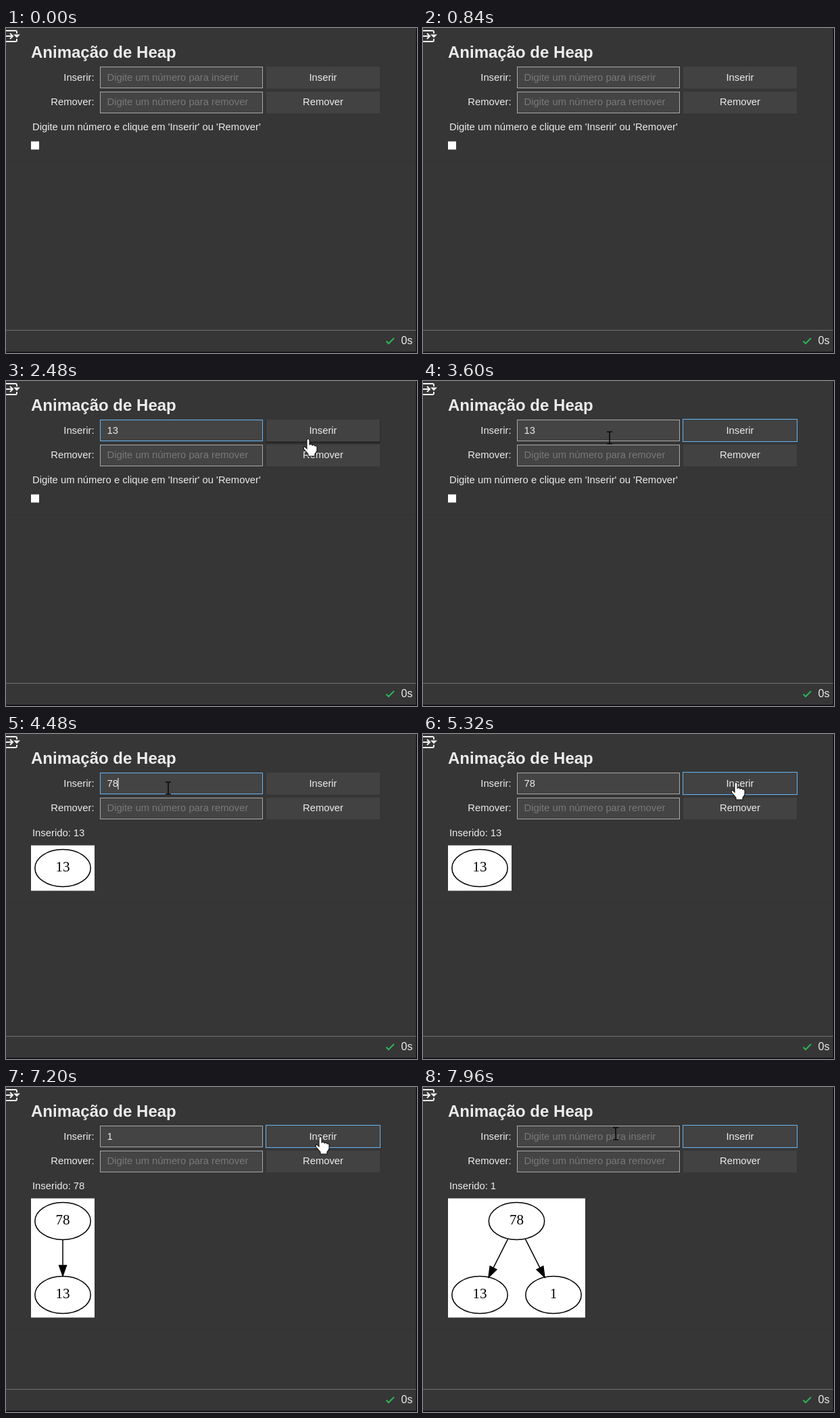
Write an HTML page that moves like this. It is 608 by 480 pixels and loops after 8000 ms.

```html
<!DOCTYPE html>
<html lang="pt">
<head>
<meta charset="utf-8">
<title>Animação de Heap</title>
<style>
  html, body { margin: 0; width: 100%; height: 100%; overflow: hidden; background: #363636; }
  svg { display: block; width: 608px; height: 480px; }
  text { font-family: "Liberation Sans", Arial, sans-serif; font-size: 14.8px; fill: #ececec; }
  .title { font-size: 24px; font-weight: bold; }
  .end { text-anchor: end; }
  .mid, .node text { text-anchor: middle; }
  .hint { fill: #797979; }
  .field { fill: #444; stroke: #a9a9a9; }
  .button { fill: #424242; }
  .focus { stroke: #64b5f6; }
  .node ellipse { fill: #fff; stroke: #000; stroke-width: 1.5; }
  .node text { font: 21px "Liberation Serif", Times, serif; fill: #000; }
  .edge { stroke: #000; stroke-width: 1.5; }
</style>
</head>
<body>
<svg viewBox="0 0 608 480">
  <rect width="608" height="480" fill="#363636"/>
  <path id="divider" d="M0 .5H607" stroke="#323232"/>

  <g fill="none" stroke="#f0f0f0" stroke-width="2">
    <path d="M-2 4H14Q16 4 16 6V8M16 16V18Q16 20 14 20H-2M0 12H9M6 8L10 12L6 16"/>
    <path d="M11 9.5H21L16 14.5Z" fill="#f0f0f0" stroke="none"/>
  </g>

  <text class="title" x="37" y="44">Animação de Heap</text>
  <text class="end" x="130.5" y="78">Inserir:</text>
  <text class="end" x="130.5" y="114">Remover:</text>
  <rect id="field" class="field" x="139.5" y="57.5" width="240" height="31"/>
  <rect class="field" x="139.5" y="94.5" width="240" height="31"/>
  <text id="value" x="149.5" y="78"></text>
  <text class="hint" x="149.5" y="114">Digite um número para remover</text>
  <path id="caret" d="M.5 65V82" stroke="#fff"/>

  <g id="shadow" fill="#000">
    <rect x="384" y="58" width="170" height="34" opacity=".2"/>
    <rect x="385" y="58" width="168" height="33" opacity=".25"/>
  </g>
  <rect class="button" x="385" y="57" width="168" height="32.5"/>
  <rect class="button" x="385" y="94" width="168" height="32"/>
  <rect id="ring" class="focus" x="384.5" y="56.5" width="169" height="33" fill="none"/>
  <text class="mid" x="469" y="78">Inserir</text>
  <text class="mid" x="469" y="114">Remover</text>

  <text id="status" x="39" y="150.5"></text>
  <g id="tree"></g>

  <path d="M0 446.5H607" stroke="#707070"/>
  <path d="M562.5 462.5L566 466L574 458" fill="none" stroke="#2fb457" stroke-width="2"/>
  <text x="584.5" y="467" style="font-size:16px">0s</text>
  <path d="M607.5 0V480M0 479H608" stroke="#0c0912" stroke-width="1.6"/>

  <path id="beam" d="M-4 -9H-1L0 -8L1 -9H4M0 -8V8M-4 9H-1L0 8L1 9H4" fill="none" stroke="#0a0a0a" stroke-width="1.6"/>
  <path id="hand" d="M-2 1Q0 -2 2 1V8Q5 6 6 9Q9 7 10 10Q13 9 13 12V17Q12 20 10 22V25H0V22L-6 15Q-8 11 -5 11L-2 14Z"
    fill="#fff" stroke="#111" stroke-width="1.1"/>
</svg>
<script>
const LOOP = 8000;
const $ = id => document.getElementById(id);
const HINT = 'Digite um número para inserir';

// [time, state]
const typed = [[0, ''], [1750, '1'], [1900, '13'], [3700, ''], [4250, '7'], [4450, '78'],
  [5700, ''], [6200, '1'], [7600, '']];
const focus = [[0, ''], [1200, 'field'], [2750, 'button'], [3850, 'field'], [5200, 'button'],
  [6050, 'field'], [7100, 'button']];
const trees = [[0, 0], [3700, 1], [5700, 2], [7600, 3]];
// [time, x, y]
const mouse = [[1000, 330, 84], [1300, 345, 84], [1600, 368, 96], [1950, 372, 96], [2480, 447, 86],
  [2750, 465, 74], [3050, 465, 74], [3600, 276, 84], [3900, 240, 80], [4600, 240, 80],
  [5100, 463, 72], [5450, 463, 72], [6000, 242, 85], [6550, 242, 85], [7000, 465, 74],
  [7350, 465, 74], [7960, 285, 69], [8000, 285, 69]];

const node = (x, y, label) =>
  `<g class="node"><ellipse cx="${x}" cy="${y}" rx="41.2" ry="27.5"/><text x="${x}" y="${y + 5}">${label}</text></g>`;

function edge(x1, y1, x2, y2) {
  const length = Math.hypot(x2 - x1, y2 - y1);
  const angle = Math.atan2(y2 - y1, x2 - x1) * 180 / Math.PI;
  return `<g class="edge" transform="translate(${x1} ${y1}) rotate(${angle})">
    <path d="M0 0H${length - 15}"/><path d="M${length} 0l-15.5 -5.4v10.8Z"/></g>`;
}

const paper = (w, h) => `<rect x="37" y="164.5" width="${w}" height="${h}" fill="#fff"/>`;

const scenes = [
  { status: "Digite um número e clique em 'Inserir' ou 'Remover'", line: 197,
    art: '<rect x="37" y="167.5" width="12" height="12" fill="#fff"/>' },
  { status: 'Inserido: 13', line: 248, art: paper(94, 67) + node(84, 198, 13) },
  { status: 'Inserido: 78', line: 357,
    art: paper(94, 176) + node(84, 198, 78) + node(84, 307, 13) + edge(84, 225.5, 84, 279) },
  { status: 'Inserido: 1', line: 357,
    art: paper(203, 176) + node(138.5, 198, 78) + node(84, 307, 13) + node(193, 307, 1)
      + edge(125.8, 224.2, 97, 281) + edge(151.2, 224.2, 180, 281) }
];

const current = (track, t) => track.findLast(step => step[0] <= t);
const show = (id, on) => $(id).setAttribute('visibility', on ? 'visible' : 'hidden');

function mouseAt(t) {
  const i = mouse.findIndex(k => k[0] > t);
  if (i < 1) return null;
  const [t0, x0, y0] = mouse[i - 1], [t1, x1, y1] = mouse[i];
  const p = (t - t0) / (t1 - t0), e = p * p * (3 - 2 * p);
  return [x0 + (x1 - x0) * e, y0 + (y1 - y0) * e];
}

let shownTree = -1;
function drawTree(index) {
  if (index === shownTree) return;
  shownTree = index;
  const scene = scenes[index];
  $('status').textContent = scene.status;
  $('tree').innerHTML = scene.art;
  $('divider').setAttribute('transform', `translate(0 ${scene.line})`);
}

function draw(t) {
  const [typedAt, text] = current(typed, t);
  const [focusAt, target] = current(focus, t);
  const inField = target === 'field';

  $('value').textContent = text || HINT;
  $('value').classList.toggle('hint', !text);
  $('field').classList.toggle('focus', inField);
  show('ring', target === 'button');

  const blinkOn = (t - Math.max(typedAt, focusAt)) % 1060 < 530;
  show('caret', inField && blinkOn);
  $('caret').setAttribute('transform', `translate(${149 + text.length * 8.23} 0)`);

  drawTree(current(trees, t)[1]);

  const pos = mouseAt(t);
  const overButton = !!pos && pos[0] > 382;
  show('beam', pos && !overButton);
  show('hand', overButton);
  show('shadow', overButton && target !== 'button');
  if (pos) for (const id of ['beam', 'hand'])
    $(id).setAttribute('transform', `translate(${pos.map(Math.round).join(' ')})`);
}

const start = performance.now();
function tick(now) {
  draw(Math.max(0, now - start) % LOOP);
  requestAnimationFrame(tick);
}
draw(0);
requestAnimationFrame(tick);
</script>
</body>
</html>
```
